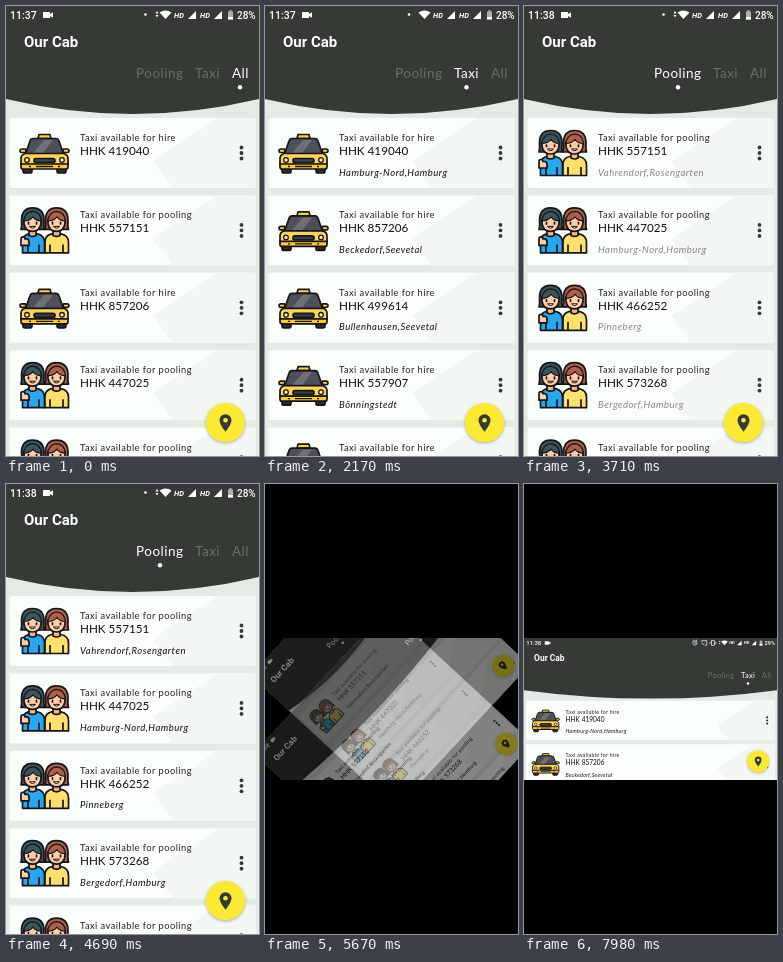
An HTML page that plays this animation: 253 by 450 pixels, repeating every 8 s.

```html
<!DOCTYPE html>
<html lang="en">
<head>
<meta charset="utf-8">
<title>Our Cab</title>
<style>
  html, body { margin: 0; width: 100%; height: 100%; overflow: hidden; background: #000; }
  svg { display: block; }
  text { font-family: Lato, sans-serif; }
  .title, .status { font-family: Roboto, sans-serif; fill: #fff; }
  .title { font-size: 15px; font-weight: 700; }
  .status { font-size: 10.5px; font-weight: 500; }
  .hd { font: italic 700 7.5px Roboto, sans-serif; fill: #fff; }
  .tab { font-size: 13.5px; letter-spacing: .5px; }
  .kind { font-size: 9.3px; letter-spacing: .46px; fill: #222; }
  .plate { font-size: 11.7px; fill: #111; }
  .place { font-size: 9.5px; letter-spacing: .5px; font-style: italic; fill: #111; }
  .fab { filter: drop-shadow(0 1.5px 1.5px rgba(0, 0, 0, .3)); }
</style>
</head>
<body>
<svg width="100%" height="100%" viewBox="0 0 253 450">
  <defs>
    <!-- icons share the card's coordinates -->
    <g id="hire" stroke="#15151a" stroke-width="1.7" stroke-linejoin="round">
      <path d="M14 48h9v5q0 2-2 2h-5q-2 0-2-2zM48 48h9v5q0 2-2 2h-5q-2 0-2-2z" fill="#2b2c31"/>
      <path d="M29 20.500l1-4h11l1 4z" fill="#ffd23c"/>
      <path d="M16.500 36l4.500-13q.8-2.500 3-2.500h23q2.200 0 3 2.500l4.500 13z" fill="#4d5157"/>
      <path d="M35 22h9l-10 13h-10z" fill="#6d7177" stroke="none"/>
      <path d="M17 34.500h-4.500q-1.500 0-1.500-1.500 0-2 2-2h3.500zM54 34.500h4.500q1.500 0 1.500-1.500 0-2-2-2h-3.500z" fill="#ffd23c"/>
      <path d="M16 35.500h39q4 1.500 4 5v6h-47v-6q0-3.500 4-5z" fill="#ffd45a"/>
      <path d="M12 46h47v3q0 2-2 2h-43q-2 0-2-2z" fill="#ffc93a"/>
      <rect x="25" y="40.500" width="21" height="4" rx="2" fill="#3c3f45"/>
      <circle cx="18" cy="42" r="2.300" fill="#fff3c4" stroke-width="1.300"/>
      <circle cx="53" cy="42" r="2.300" fill="#fff3c4" stroke-width="1.300"/>
      <path d="M20 48.500h2M27 48.500h17M49 48.500h2" stroke-width="1.300"/>
    </g>
    <g id="friend" stroke="#15151a" stroke-width="1.7" stroke-linejoin="round">
      <path d="M12 34q1-3 .5-9 0-12.500 11-12.500 11.500 0 11.500 12.500-.5 6 .5 9z"/>
      <path d="M20 33h7v7q-3.500 2-7 0z" fill="#f3b58c"/>
      <path d="M15 24q1-3 8.500-3 7.500 0 8.500 3v4q-1 8-8.500 8t-8.500-8z" fill="#ffcda6"/>
      <path d="M14.500 25.500q2-9 9-9.500 8 .5 9 9.500-6 0-8.500-4-3 4-9.500 4z" stroke-width="1.200"/>
      <path d="M19.500 27v1.500M27.500 27v1.500" stroke-linecap="round"/>
      <path d="M20.500 31q3 3.500 6 0z" fill="#fff" stroke-width="1"/>
    </g>
    <g id="pooling" stroke="#15151a" stroke-width="1.7" stroke-linejoin="round">
      <path d="M13.500 57.500v-11q0-6.500 6-8h9q7 1.500 7 8.500v10.500z" fill="#28a6ee"/>
      <path d="M36 57.500v-11q0-6.500 6.500-8h9.500q7.500 1.500 7.500 8.500v10.500z" fill="#ffe06c"/>
      <path d="M19 57v-7M30 57v-8M41 57v-8M54 57v-8" fill="none"/>
      <use href="#friend" fill="#3a565c"/>
      <use href="#friend" x="24" fill="#ad5f47"/>
      <path d="M12 43.500q0-2 2-2t2 2h2q2 .5 2 3v3.500h-8z" fill="#ffcda6"/>
    </g>
  </defs>
  <g id="stage"></g>
</svg>
<script>
const LOOP = 8000, STAGE_W = 253, STAGE_H = 450, SHRINK = STAGE_W / STAGE_H;
const DARK = '#353a34';
const stage = document.getElementById('stage');

const ride = (kind, plate = '', place = '') => ({ kind, plate, place });
const nord = ride('hire', '419040', 'Hamburg-Nord,Hamburg');
const beckedorf = ride('hire', '857206', 'Beckedorf,Seevetal');
const vahrendorf = ride('pooling', '557151', 'Vahrendorf,Rosengarten');
const nordPool = ride('pooling', '447025', 'Hamburg-Nord,Hamburg');
const lists = {
  All: [nord, vahrendorf, beckedorf, nordPool, ride('pooling')],
  Taxi: [nord, beckedorf, ride('hire', '499614', 'Bullenhausen,Seevetal'),
    ride('hire', '557907', 'Bönningstedt'), ride('hire')],
  Pooling: [vahrendorf, nordPool, ride('pooling', '466252', 'Pinneberg'),
    ride('pooling', '573268', 'Bergedorf,Hamburg'), ride('pooling')],
};
const tabs = [['Pooling', 130, 154], ['Taxi', 189, 201.5], ['All', 226, 234]];

// Tab selections: [time, tab, time at which the places arrive]
const visits = [[0, 'All', 70], [1820, 'Taxi', 2100], [3430, 'Pooling', 3710], [6790, 'Taxi', 7000]];

const text = (cls, x, y, value, extra = '') =>
  `<text class="${cls}" x="${x}" y="${y}" ${extra}>${value}</text>`;

function card({ kind, plate, place }, index, shift, placeAlpha) {
  const dots = [29.5, 35, 40.5].map(y => `<circle cx="${235.5 + shift}" cy="${y}" r="1.9" fill="${DARK}"/>`);
  return `<g transform="translate(0 ${112 + index * 77.4})">
    <rect x="3.5" y=".5" width="${246 + shift}" height="70" rx="2" fill="#dde1dc"/>
    <rect x="3.5" width="${246 + shift}" height="70" rx="2" fill="#fbfffb"/>
    <path transform="translate(${shift})" d="M212 0L147 43L167 70H249.500V0z" fill="#f3f7f3"/>
    <use href="#${kind}" x="3"/>
    ${text('kind', 74, 23, 'Taxi available for ' + kind)}
    ${plate && text('plate', 74, 37, 'HHK ' + plate)}
    ${text('place', 74, 57.5, place, `opacity="${placeAlpha}"`)}
    ${dots.join('')}</g>`;
}

function statusBar({ clock, battery, arrows }, shift) {
  const signal = x => `<path d="M${x} 13h8v-8z"/>`;
  const extras = shift
    ? `<g fill="none" stroke="#fff" stroke-width="1.2">
        <circle cx="107" cy="9" r="3.800"/><path d="M107 6.500v2.500h2M103 5l2-1.500M111 5l-2-1.500"/>
        <path d="M119 7v-2h9v8h-4M119 9.500q3 0 3.500 3.500"/><rect x="136.500" y="5" width="5" height="8"/>
        <path d="M134 7v4M144 7v4"/></g>`
    : `<circle cx="${arrows ? 139.5 : 144}" cy="8.500" r="1.300"/>`;
  return `${text('status', 4, 12.5, clock)}
    <path d="M37 6h7v2l3-1.700v5.400l-3-1.700v2h-7z" fill="#fff"/>
    <g transform="translate(${shift})" fill="#fff">${extras}
      ${arrows ? '<path d="M149.500 7.500l1.500-2.500 1.500 2.500zM149.500 9l1.500 2.500 1.500-2.500z"/>' : ''}
      <path d="M153.500 6.500q6-4 12 0l-6 6.500z"/>
      ${text('hd', 168, 11.5, 'HD')}${signal(182)}${text('hd', 194, 11.5, 'HD')}${signal(208)}
      <path d="M222 5.500h1.500v-1.500h2v1.500h1.500v8h-5z" opacity=".6"/><path d="M222 11h5v2.500h-5z"/>
      ${text('status', 231, 12.5, battery + '%', 'style="font-size:10px"')}</g>`;
}

function screen(width, height, state) {
  const shift = width - STAGE_W;
  const tabBar = tabs.map(([name, x, dotX]) => {
    const active = name === state.tab;
    return text('tab', x, 72, name, `fill="${active ? '#fff' : '#6b6f69'}"`) +
      (active ? `<circle cx="${dotX}" cy="81.300" r="2.200" fill="#fff"/>` : '');
  }).join('');
  return `<svg width="${width}" height="${height}">
    <rect width="100%" height="100%" fill="#e5eae5"/>
    ${lists[state.tab].map((item, i) => card(item, i, shift, state.placeAlpha)).join('')}
    <path d="M0 0H${width}V93Q${width / 2} 123 0 93z" fill="${DARK}"/>
    ${statusBar(state, shift)}
    ${text('title', 18, 40.5, 'Our Cab')}
    <g transform="translate(${shift})">${tabBar}</g>
    <g transform="translate(${219.5 + shift} ${height - 33.3})">
      <circle class="fab" r="19.6" fill="#fbe934"/>
      <path d="M0 9Q-6 1.500-6-2.500A6 6 0 0 1 6-2.500Q6 1.500 0 9z" fill="${DARK}"/>
      <circle cy="-2.500" r="2.300" fill="#fbe934"/>
    </g></svg>`;
}

// A screen shrunk about the middle of the stage
const turned = (width, height, state, angle, alpha) =>
  `<g transform="translate(${STAGE_W / 2} ${STAGE_H / 2}) rotate(${angle}) scale(${SHRINK})
    translate(${-width / 2} ${-height / 2})" opacity="${alpha}">${screen(width, height, state)}</g>`;

function picture(t) {
  const [, tab, placesAt] = visits.filter(([start]) => start <= t).pop();
  const state = {
    tab,
    placeAlpha: t < placesAt ? 0 : t < placesAt + 70 ? 0.5 : 1,
    clock: t < 3430 ? '11:37' : '11:38',
    battery: t < 7700 ? 28 : 29,
    arrows: t < 1820 || t >= 3430,
  };
  if (t < 4900) return screen(STAGE_W, STAGE_H, state);

  const p = Math.min(1, Math.max(0, (t - 5400) / 560));
  const turn = p * p * (3 - 2 * p);
  const angle = -90 * (1 - turn);
  const before = turn < 1 ? turned(STAGE_W, STAGE_H, state, angle, 1 - turn) : '';
  const after = turn > 0 ? turned(STAGE_H, STAGE_W, state, angle, turn) : '';
  const landscape = STAGE_W * SHRINK;
  return `<svg y="${(STAGE_H - landscape) / 2}" width="${STAGE_W}" height="${landscape}"
    viewBox="0 ${(STAGE_H - landscape) / 2} ${STAGE_W} ${landscape}">${before}${after}</svg>`;
}

let shown = '';
function draw() {
  const next = picture(performance.now() % LOOP);
  if (next !== shown) stage.innerHTML = shown = next;
  requestAnimationFrame(draw);
}
draw();
</script>
</body>
</html>
```
